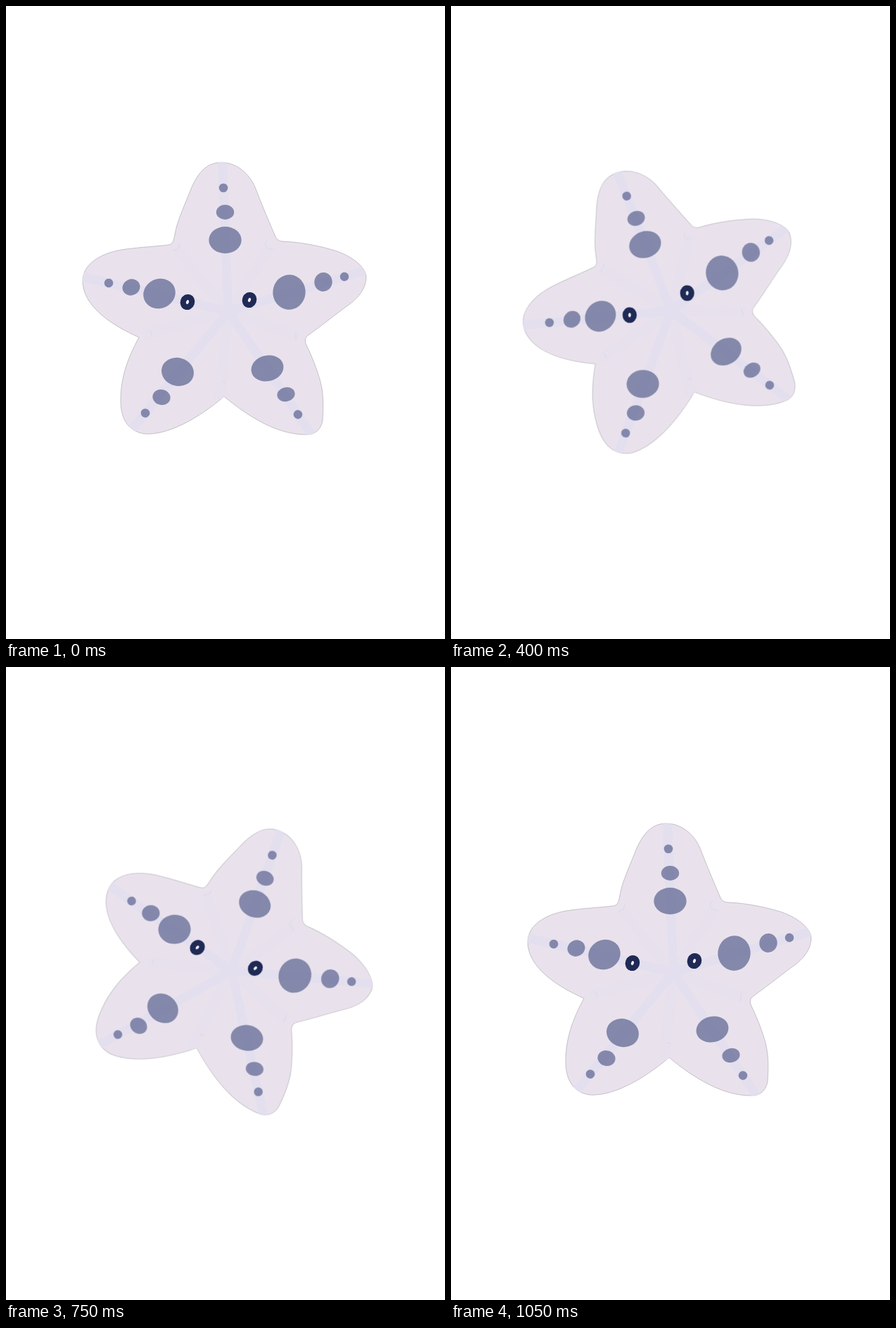
These frames come from a looping animation (624 px wide and 898 px high, 1.1 s). An HTML page:

```html
<!DOCTYPE html>
<html lang="en">
<head>
<meta charset="utf-8">
<style>
  html, body { margin: 0; width: 100%; height: 100%; overflow: hidden; background: #fff; }
  svg { display: block; width: 100vw; height: 100vh; }
  #star { transform-origin: 309.8px 438.2px; }
</style>
</head>
<body>
<svg viewBox="0 0 624 898">
  <defs>
    <path id="body" d="M306 222C328 222 346 238 354 257C362 278 373 304 382 325
      C384 331 388 334 395 334C420 335 449 341 471 348C495 357 511 371 512 384
      C512 405 495 419 480 429C463 442 445 456 431 466C425 470 424 474 427 481
      C434 495 442 515 447 533C452 552 451 572 450 588C448 600 440 608 428 608
      C387 609 345 583 310 554C271 587 229 609 197 607C171 603 163 582 163 560
      C163 525 174 498 189 470C150 453 108 425 109 389C110 364 138 349 170 345
      C192 342 214 341 230 339C238 338 238 333 240 324C243 305 255 280 264 257
      C274 235 286 222 306 222Z"/>
    <clipPath id="inside"><use href="#body"/></clipPath>
  </defs>
  <g id="star">
    <use href="#body" fill="#e9e2ed" stroke="#a3a0a8" stroke-width=".6"/>
    <g clip-path="url(#inside)" fill="none">
      <path id="faintRays" stroke="#e6e1ed" stroke-width="15"/>
      <path id="rays" stroke="#e3dfee" stroke-width="13"/>
      <path stroke="#dcd6e2" stroke-width=".8" d="M372 331C366 338 367 345 378 345
        M247 337Q246 346 238 347M412 463V474M204 459Q208 462 207 468M307 533L313 534"/>
    </g>
    <g id="spots" fill="rgb(49,61,116)" fill-opacity=".54"/>
    <g id="eyes"/>
  </g>
</svg>
<script>
const $ = id => document.getElementById(id);
const hub = [316, 433];

// spot centres from tip to hub, height/width ratio, tilt
const arms = [
  { at: [[309, 258], [311.5, 292.5], [311.5, 332]], squash: .82, tilt: 0 },
  { at: [[146, 393], [178, 399], [218, 408]], squash: .9, tilt: -25 },
  { at: [[481, 384], [451, 391.5], [402.5, 406]], squash: 1.07, tilt: 5 },
  { at: [[198, 577.5], [221, 555], [244, 519]], squash: .86, tilt: 15 },
  { at: [[415, 579.5], [398, 551], [371.5, 514]], squash: .79, tilt: -13 }
];
const radii = [6.3, 12.7, 23.2];
const notches = [[240, 343], [377, 340], [416, 469], [198, 466], [303, 558]];

function oval(parent, [cx, cy], rx, ry, tilt, fill) {
  const e = document.createElementNS("http://www.w3.org/2000/svg", "ellipse");
  const attrs = { cx, cy, rx, ry, transform: `rotate(${tilt} ${cx} ${cy})` };
  if (fill) attrs.fill = fill;
  for (const k in attrs) e.setAttribute(k, attrs[k]);
  parent.append(e);
}

const rays = ends => ends.map(p => `M${hub}L${p}`).join("");
const beyond = p => p.map((v, i) => hub[i] + (v - hub[i]) * 1.25);
$("faintRays").setAttribute("d", rays(notches));
$("rays").setAttribute("d", rays(arms.map(arm => beyond(arm.at[0]))));

for (const { at, squash, tilt } of arms) {
  at.forEach((p, i) => oval($("spots"), p, radii[i], radii[i] * (i ? squash : 1), tilt));
}
for (const eye of [[258, 420], [346, 417]]) {
  oval($("eyes"), eye, 10.2, 11.2, 20, "#1f2a55");
  oval($("eyes"), eye, 1.9, 3, 20, "#f3eff8");
}

// Swing: step, angle, shift x, shift y; a smooth closed curve runs through these
const period = 19;
const keys = [
  [0, 0, 0, 0], [2, -9.8, -.6, -2.6], [5, -26.75, -2.4, 1.6], [9, -3.85, .2, -1.8],
  [11, 9.72, .4, -4.4], [14, 23.6, 4.5, -4.1], [15, 21.15, 4.4, -3.6]
];
function key(i) {
  const n = keys.length, lap = Math.floor(i / n);
  const [step, ...values] = keys[i - lap * n];
  return [step + lap * period, ...values];
}
const slope = (i, c) => (key(i + 1)[c] - key(i)[c]) / (key(i + 1)[0] - key(i)[0]);
function tangent(i, c) {
  const before = key(i)[0] - key(i - 1)[0], after = key(i + 1)[0] - key(i)[0];
  return (slope(i - 1, c) * after + slope(i, c) * before) / (before + after);
}
function curve(step, c) {
  const i = keys.findLastIndex(k => k[0] <= step);
  const a = key(i), b = key(i + 1), span = b[0] - a[0], u = (step - a[0]) / span, v = 1 - u;
  return a[c] * v * v * (1 + 2 * u) + b[c] * u * u * (1 + 2 * v)
    + span * u * v * (tangent(i, c) * v - tangent(i + 1, c) * u);
}

// 22 ticks of 50 ms; the pose rests on ticks 2 and 11
const ticks = 22;
const frames = Array.from({ length: ticks + 1 }, (_, tick) => {
  const t = Math.min(tick, ticks - 1);
  const step = t - (t >= 2) - (t >= 11);
  const [angle, x, y] = [1, 2, 3].map(c => curve(step, c));
  const scale = 1 - .0003 * Math.abs(angle);
  return {
    offset: tick / ticks,
    easing: "step-end",
    transform: `translate(${x}px, ${y}px) rotate(${angle}deg) scale(${scale})`
  };
});
$("star").animate(frames, { duration: ticks * 50, iterations: Infinity });
</script>
</body>
</html>
```
